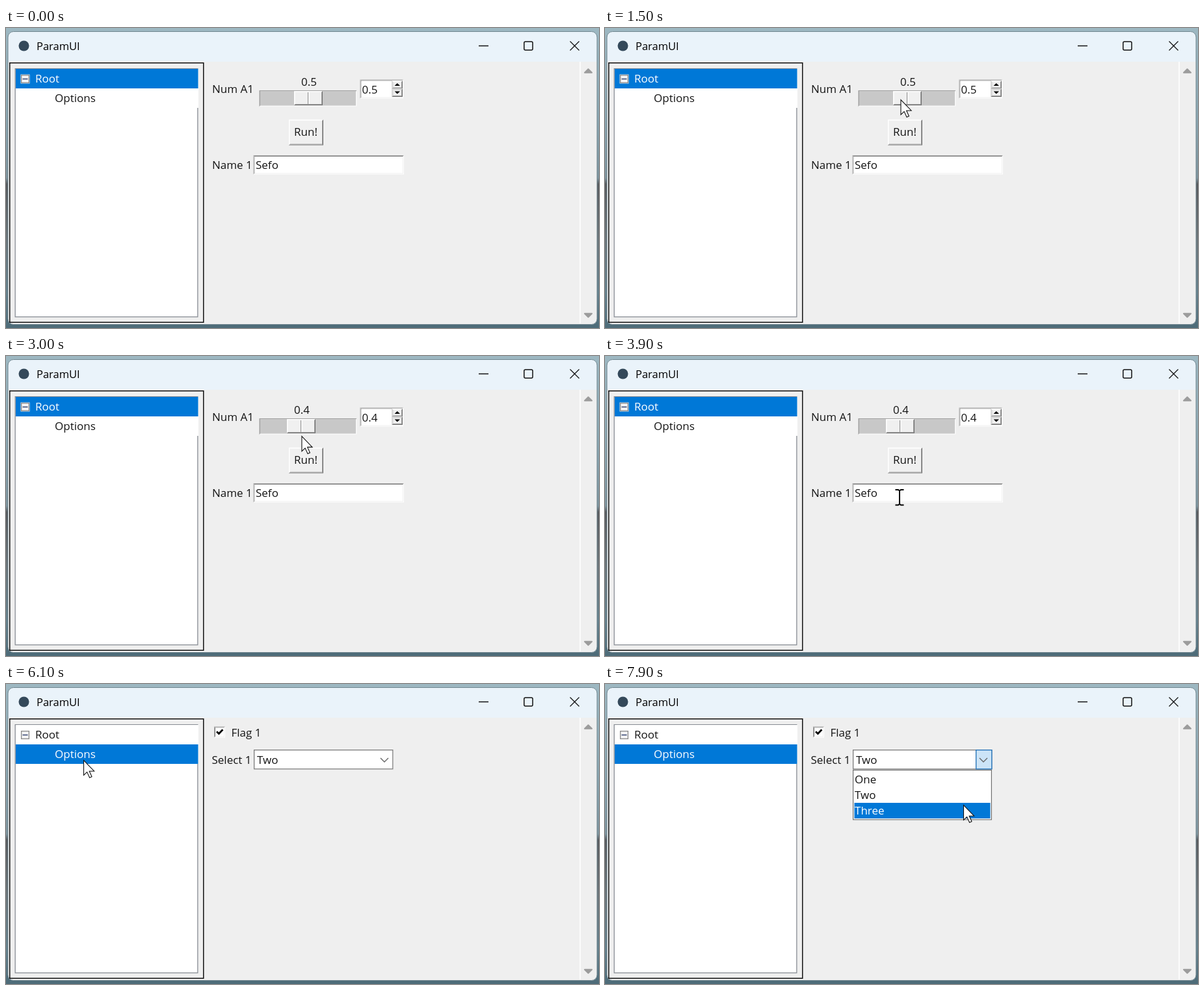
Write an HTML page that moves like this. It is 912 px wide and 462 px high and loops after 8000 ms.

```html
<!DOCTYPE html>
<html lang="en">
<head>
<meta charset="utf-8">
<title>ParamUI</title>
<style>
  html, body { margin: 0; width: 100%; height: 100%; overflow: hidden; background: #54717d; }
  svg { display: block; width: 912px; height: 462px; }
  text { font: 17px "Open Sans", "Noto Sans", sans-serif; fill: #141414; white-space: pre; }
  .title { font-size: 16.5px; fill: #000; }
  .mid { text-anchor: middle; }
  .thin { fill: none; stroke: #111; stroke-width: 1.3; }
</style>
</head>
<body>
<svg id="stage" viewBox="0 0 912 462" xmlns="http://www.w3.org/2000/svg"></svg>
<script>
const LOOP = 8000, STEP = 100;
const FACE = '#f0f0f0', BLUE = '#0078d7', INK = '#141414';

// Markup helpers
const rect = (x, y, w, h, fill, more = '') =>
  `<rect x="${x}" y="${y}" width="${w}" height="${h}" fill="${fill}" ${more}/>`;
const path = (d, fill, more = '') => `<path d="${d}" fill="${fill}" ${more}/>`;
const text = (x, y, s, more = '') => `<text x="${x}" y="${y}" ${more}>${s}</text>`;
const group = (id, ...parts) => `<g id="${id}">${parts.join('')}</g>`;
const frame = (x, y, w, h, color, n = 1, more = '') =>
  rect(x + n / 2, y + n / 2, w - n, h - n, 'none', `stroke="${color}" stroke-width="${n}" ${more}`);

// Box with separate top/left and bottom/right edge colours
const bevel = (x, y, w, h, face, light, dark, n = 1) =>
  rect(x, y, w, h, dark) +
  path(`M${x} ${y}h${w}l${-n} ${n}h${2 * n - w}v${h - 2 * n}l${-n} ${n}z`, light) +
  rect(x + n, y + n, w - 2 * n, h - 2 * n, face);
const raised = (x, y, w, h) =>
  bevel(x, y, w, h, FACE, '#fff', '#6f6f6f') +
  bevel(x + 1, y + 1, w - 2, h - 2, FACE, '#f8f8f8', '#a0a0a0');
const sunken = (x, y, w, h, face = '#fff') =>
  bevel(x, y, w, h, face, '#a6a6a6', '#fff') +
  bevel(x + 1, y + 1, w - 2, h - 2, face, '#808080', '#f0f0f0');

const tri = (x, y, r, dir, fill, more = '') =>
  path(`M${x - r} ${y + dir * r / 2}h${2 * r}L${x} ${y - dir * r / 2}z`, fill, more);
const scrollTri = (y, dir) =>
  tri(895.5, y, 5.5, dir, '#9c9c9c', 'stroke="#9c9c9c" stroke-width="2" stroke-linejoin="round"');

const backdrop =
  `<defs>
    <linearGradient id="side" x2="0" y2="1">
      <stop offset="0" stop-color="#9db8c2"/><stop offset=".3" stop-color="#8aa5b0"/>
      <stop offset=".5" stop-color="#7d939d"/><stop offset=".52" stop-color="#55585c"/>
      <stop offset=".7" stop-color="#6b7479"/><stop offset=".88" stop-color="#64808c"/>
      <stop offset="1" stop-color="#4d6b78"/>
    </linearGradient>
    <clipPath id="win"><rect x="3" y="5.5" width="906" height="451" rx="8"/></clipPath>
  </defs>` + rect(0, 0, 912, 462, 'url(#side)');

const chrome =
  `<g clip-path="url(#win)">` + rect(3, 5, 906, 47, '#eaf3fa') + rect(3, 52, 906, 406, '#efefef') +
  rect(882, 52, 2, 403, '#fbfbfb') + `</g>` +
  frame(2.5, 5, 907, 452, '#70868f', 1, 'rx="8.5"') +
  '<circle cx="27.5" cy="27.5" r="8" fill="#34495a"/>' +
  text(47, 34, 'ParamUI', 'class="title"') +
  '<path class="thin" d="M727 27.5h15M867.5 20.5l14 14m0-14l-14 14"/>' +
  '<rect class="thin" x="796.8" y="21" width="13.2" height="13" rx="2" style="stroke-width:1.5"/>' +
  scrollTri(66, 1) + scrollTri(442.5, -1);

const tree =
  frame(5, 53, 299.5, 401, '#111', 1.5) +
  rect(13.5, 62, 282, 383.5, '#fff') + frame(13.5, 62, 282, 383.5, '#858a92', 1.3) +
  rect(15, 63, 281, 60, '#fff') +
  rect(15, 63, 280.5, 30, BLUE, 'id="row"') +
  rect(22.5, 71.5, 14, 14, '#f4f4f4') + frame(23, 72, 13, 13, '#8b8b8b', 1.3) +
  rect(25.5, 77.7, 8, 1.6, '#3b4b78') +
  text(45, 84, 'Root', 'id="root"') + text(75, 114, 'Options', 'id="options"');

const spinButton = (y, dir) => raised(593.5, y, 16.5, 12.5) + tri(601.8, y + 6, 4.2, dir, '#000');
const thumb = (id, draw) => group(id, draw(0, 97, 44, 22), rect(21, 99, 1.3, 18, '#909090'),
  rect(22.3, 99, 1.2, 18, '#fff'));

const params = group('params',
  frame(309, 53, 573, 401, '#666', 2.6, 'id="focus"'),
  text(317, 100, 'Num A1'),
  bevel(389.5, 96, 150, 25, '#c8c8c8', '#a0a0a0', '#f8f8f8', 1.5),
  group('slider', thumb('up', raised), thumb('down', (...a) => sunken(...a, '#ececec')),
    text(23, 88.7, '', 'id="value" class="mid"')),
  sunken(544.5, 79.5, 66.5, 29), text(547.5, 100.6, '', 'id="spin"'),
  spinButton(81, 1), spinButton(93.5, -1),
  group('runUp', raised(435, 141, 53, 39.5)),
  group('runDown', bevel(435, 141, 53, 39.5, FACE, '#858585', '#fdfdfd', 2)),
  text(443, 166, 'Run!', 'id="run"'),
  text(317, 217, 'Name 1'), sunken(380.5, 196, 231.5, 29.5),
  text(384, 217, '', 'id="name"'), rect(0, 200, 2.4, 22, '#000', 'id="caret"'));

const item = (s, i) => text(384, 153 + 24 * i, s, 'class="item"');
const options = group('opts',
  sunken(320, 65.5, 17, 17),
  path('M324 73.2l3.4 3.3 6-6.2', 'none', 'stroke="#000" stroke-width="2.8"'),
  text(346.5, 81, 'Flag 1'), text(316.5, 123, 'Select 1'),
  rect(381, 101, 214.5, 30.5, '#fff'), frame(381, 101, 214.5, 30.5, '#7c7c7c', 1.3),
  group('hot', rect(570, 101, 25.5, 30.5, '#cce4f7'), frame(570, 101, 25.5, 30.5, '#1f6fb5', 1.3)),
  path('M576 114l6 6 6-6', 'none', 'stroke="#666" stroke-width="1.4"'),
  text(386, 123, 'Two'),
  group('list', rect(381, 132, 214, 77.5, '#fff'), frame(381, 132, 214, 77.5, '#707070', 1.2),
    rect(383.5, 0, 209, 24, BLUE, 'id="pick"'), ['One', 'Two', 'Three'].map(item).join('')));

const pointer =
  group('arrow', path('M.5.5V23.5L5.6 18.6 9.6 27.2 13 25.7 9.2 17.2H16.6z', '#fff',
    'stroke="#111" stroke-width="1.1"')) +
  group('beam', path('M-6.5-11h4.5l2 1.5 2-1.5h4.5M-6.5 12.5h4.5l2-1.5 2 1.5h4.5M0-10V11.5', 'none',
    'stroke="#000" stroke-width="2"'));

stage.innerHTML = backdrop + chrome + tree + params + options + pointer;
const el = id => document.getElementById(id);
const items = [...document.querySelectorAll('.item')];

// Pointer stops: time, x, y
const stops = [
  [200, 610, 475], [900, 449, 110], [1300, 449, 110], [1700, 460, 110], [2300, 460, 110],
  [2600, 449, 110], [2900, 449, 110], [3200, 470, 161], [3700, 470, 161], [3900, 453, 217],
  [4100, 453, 217], [4200, 452, 217], [5300, 452, 217], [5900, 119, 117], [6400, 119, 117],
  [7000, 580, 113], [7300, 580, 113], [7800, 551, 186], [LOOP, 551, 186]
];

function pointerAt(t) {
  const i = stops.findIndex(s => s[0] > t);
  if (i < 1) return stops[0].slice(1);
  const [t0, x0, y0] = stops[i - 1], [t1, x1, y1] = stops[i];
  const u = (t - t0) / (t1 - t0), k = u * u * (3 - 2 * u);
  return [x0 + (x1 - x0) * k, y0 + (y1 - y0) * k];
}

const show = (id, on) => el(id).setAttribute('visibility', on ? 'inherit' : 'hidden');
const move = (id, x, y) => el(id).setAttribute('transform', `translate(${x} ${y})`);
const say = (id, s) => { if (el(id).textContent !== s) el(id).textContent = s; };
const tint = (node, on) => { node.style.fill = on ? '#fff' : INK; };

function draw(time) {
  const t = Math.floor(time / STEP) * STEP;
  const within = (a, b) => t >= a && t < b;
  const [x, y] = pointerAt(t);
  const onOptions = t >= 6000;

  show('params', !onOptions);
  show('opts', onOptions);
  el('row').setAttribute('y', onOptions ? 93 : 63);
  tint(el('root'), !onOptions);
  tint(el('options'), onOptions);

  const value = t < 2500 ? 0.5 : 0.4, held = within(1900, 2800);
  move('slider', value === 0.5 ? 443 : 432, 0);
  say('value', value.toFixed(1));
  say('spin', value.toFixed(1));
  show('up', !held && !onOptions);
  show('down', held);

  const pressed = within(3300, 3500);
  show('runUp', !pressed && !onOptions);
  show('runDown', pressed);
  move('run', +pressed, +pressed);

  const focused = within(4100, 6000);
  const typed = [4700, 4900, 5100].filter(k => t >= k).length;
  show('focus', focused);
  say('name', 'Sefo' + 'x'.repeat(typed));
  show('caret', focused && (t - 4100) % 900 < 600);
  move('caret', 384 + el('name').getComputedTextLength(), 0);

  const open = t >= 7200;
  const pick = y > 183 ? 2 : 1;
  show('hot', onOptions && (open || x > 570));
  show('list', open);
  el('pick').setAttribute('y', 135 + 24 * pick - 24 + 24 * 0 + 0);
  el('pick').setAttribute('y', 135 + 24 * pick);
  items.forEach((node, i) => tint(node, i === pick));

  const overEntry = !onOptions && x > 381 && x < 612 && y > 196 && y < 226 && t > 3700;
  show('arrow', !overEntry && t > 200);
  show('beam', overEntry);
  move('arrow', x, y);
  move('beam', x, y);
}

const start = performance.now();
function tick() {
  draw((performance.now() - start) % LOOP);
  requestAnimationFrame(tick);
}
tick();
</script>
</body>
</html>
```
